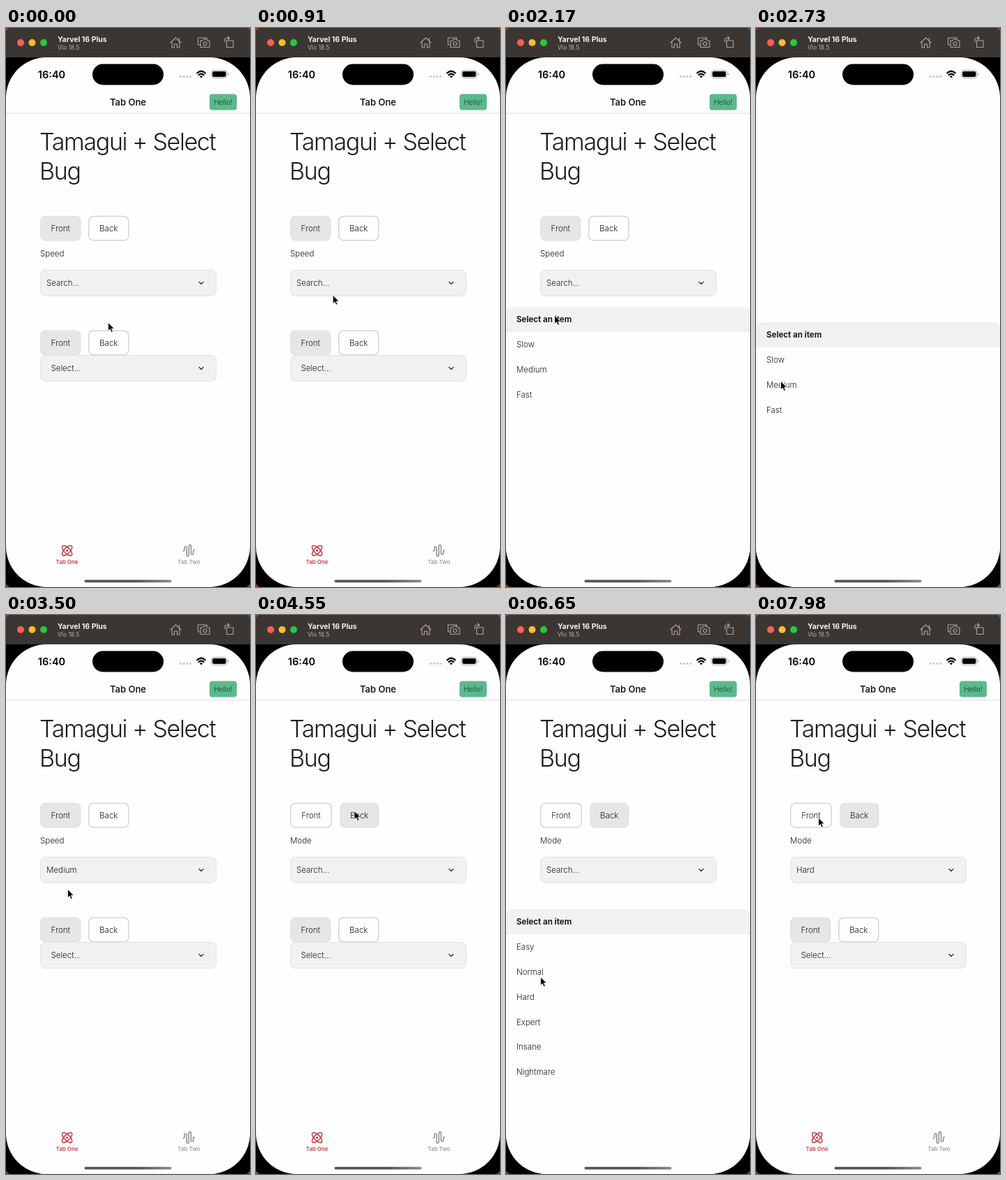
Recreate the animation shown at these times as an HTML page. Size 350 px wide and 800 px high, loop 8000 ms.

```html
<!DOCTYPE html>
<html lang="en">
<head>
<meta charset="utf-8">
<title>Select demo</title>
<style>
  html, body { margin: 0; width: 100%; height: 100%; overflow: hidden; background: #8d4c36; }
  svg { display: block; width: 100%; height: 100%; }
  text { font: 300 11.5px Inter, Roboto, sans-serif; fill: #1c1c1c; }
  .mid { text-anchor: middle; }
  .line { fill: none; stroke-linecap: round; stroke-linejoin: round; }
</style>
</head>
<body>
<svg viewBox="0 0 350 800" preserveAspectRatio="none">
  <defs>
    <clipPath id="screen"><rect y="42" width="350" height="758" rx="58"/></clipPath>
    <linearGradient id="bar"><stop offset=".6" stop-color="#565656"/><stop offset="1" stop-color="#8a8a8a"/></linearGradient>
  </defs>
  <rect width="350" height="800" rx="7"/>
  <path d="M0 42V7a7 7 0 0 1 7-7H343a7 7 0 0 1 7 7V42Z" fill="#3c3633"/>
  <circle cx="21" cy="21" r="5" fill="#ff5f57"/>
  <circle cx="37.5" cy="21" r="5" fill="#febc2e"/>
  <circle cx="54" cy="21" r="5" fill="#28c840"/>
  <text x="74" y="20" style="font-size:10.5px;font-weight:700;fill:#f3f1f0">Yarvel 16 Plus</text>
  <text x="74" y="31" style="font-size:8.5px;font-weight:400;fill:#b3aeab">Vlo 18.5</text>
  <g class="line" stroke="#aaa5a2" stroke-width="1.1">
    <path d="M236 21l7.5-7 7.500 7M238 20v8h3.500v-5h4v5h3.500v-8M248.500 18v-3.500"/>
    <path d="M278 24h-2.500v-10h12.500v2.500M279 18h3l1.500-2h4l1.500 2h3v9.500h-13z"/>
    <circle cx="285.500" cy="22.500" r="2.500"/>
    <path d="M316.500 18h9.500v9.500h-9.500zM314 20v-3.500q0-2 2-2h4M318 12l2.500 2.500-2.500 2.500"/>
  </g>

  <g clip-path="url(#screen)">
    <rect y="42" width="350" height="758" fill="#fefefe"/>
    <g id="page">
      <text class="mid" x="175" y="111" style="font-size:13px;font-weight:600">Tab One</text>
      <rect x="292" y="94.500" width="39" height="23" rx="4" fill="#5bb98c"/>
      <text class="mid" x="311.500" y="109.700" style="font-size:10px;fill:#193b2d">Hello!</text>
      <path d="M0 122H350" stroke="#dcdcdc"/>
      <g style="letter-spacing:-1.35px">
        <text x="48" y="175" style="font-size:34px">Tamagui + Select</text>
        <text x="48" y="217" style="font-size:34px">Bug</text>
      </g>
      <g id="frontRow"></g>
      <g id="backRow"></g>
      <text id="label" x="49" y="327"></text>
      <g id="search"></g>
      <g id="lowerRow"></g>
      <g id="lowerSelect"></g>
      <g class="line" stroke="#cf3f49" stroke-width="2" transform="translate(78 738.300) scale(.8)">
        <ellipse cx="12" cy="12" rx="11.700" ry="5" transform="rotate(45 12 12)"/>
        <ellipse cx="12" cy="12" rx="11.700" ry="5" transform="rotate(-45 12 12)"/>
        <circle cx="12" cy="12" r="1"/>
      </g>
      <path class="line" stroke="#929292" stroke-width="2" transform="translate(252.700 738.300) scale(.8)"
        d="M2 13a2 2 0 0 0 2-2V7a2 2 0 0 1 4 0v13a2 2 0 0 0 4 0V4a2 2 0 0 1 4 0v13a2 2 0 0 0 4 0v-4a2 2 0 0 1 2-2"/>
      <text class="mid" x="87.500" y="767" style="font-size:8px;font-weight:600;fill:#cf3f49">Tab One</text>
      <text class="mid" x="262.500" y="767" style="font-size:8px;font-weight:500;fill:#929292">Tab Two</text>
    </g>
    <g id="sheet">
      <rect width="350" height="900" rx="8" fill="#fefefe"/>
      <path d="M0 36V8a8 8 0 0 1 8-8H342a8 8 0 0 1 8 8V36Z" fill="#f1f1f1"/>
      <text x="15" y="22" style="font-weight:700">Select an item</text>
      <g id="speeds"></g>
      <g id="modes"></g>
    </g>
    <rect x="124" y="51.500" width="102" height="30" rx="15"/>
    <text class="mid" x="65.500" y="71.500" style="font-size:14.5px;font-weight:600;fill:#000">16:40</text>
    <path class="line" d="M250.500 69.500h16" stroke="#c6c6c6" stroke-width="3.200" stroke-dasharray="0 4.700"/>
    <g class="line" stroke="#000" stroke-width="2.200" style="stroke-linecap:butt">
      <path d="M273.500 65Q280 58.500 286.500 65M275.800 67.800Q280 63.500 284.200 67.800"/>
      <path d="M277.800 69.300Q280 67.200 282.200 69.300L280 71.500Z" fill="#000" stroke="none"/>
    </g>
    <rect x="294.500" y="60.500" width="22.500" height="11" rx="3.500" fill="none" stroke="#a9a9a9"/>
    <rect x="296" y="62" width="19.500" height="8" rx="2.300"/>
    <path d="M318.500 64v4q1.500-.7 1.500-2t-1.500-2" fill="#a9a9a9"/>
    <rect x="112.500" y="789.700" width="125" height="3.800" rx="1.900" fill="url(#bar)"/>
  </g>
  <path id="cursor" d="M0 0V12.200L2.800 9.600 4.700 14 6.900 13 5 8.800H8.900Z" stroke="#fff" stroke-width=".9"/>
</svg>
<script>
const LOOP = 8000, SHEET_OPEN = 421, SHEET_CLOSED = 800;
const $ = id => document.getElementById(id);

const button = (label, x, y, width, active) => `
  <rect x="${x + .75}" y="${y + .75}" width="${width - 1.5}" height="34.500" rx="6.500"
    fill="${active ? '#e6e6e6' : '#fefefe'}" stroke="${active ? '#e3e3e3' : '#d4d4d4'}" stroke-width="1.500"/>
  <text class="mid" x="${x + width / 2}" y="${y + 22.3}">${label}</text>`;

const buttonRow = (y, front) => front
  ? button('Front', 49, y, 58.5, true) + button('Back', 118, y, 58.5, false)
  : button('Front', 49, y, 60, false) + button('Back', 120, y, 56.5, true);

const select = (y, textX, value) => `
  <rect x="49.500" y="${y}" width="252" height="37" rx="7" fill="#f1f1f1" stroke="#e2e2e2"/>
  <text x="${textX}" y="${y + 22.6}">${value}</text>
  <path class="line" d="M276.800 ${y + 16.8}l3.200 3.200 3.200-3.200" stroke="#222" stroke-width="1.200"/>`;

const list = items => items.map((item, i) =>
  `<text x="15" y="${58.2 + i * 35.8}">${item}</text>`).join('');

$('frontRow').innerHTML = buttonRow(268.7, true);
$('backRow').innerHTML = buttonRow(268.7, false);
$('lowerRow').innerHTML = buttonRow(432.4, true);
$('search').innerHTML = select(346.5, 58, 'Search...');
$('lowerSelect').innerHTML = select(468.5, 64.5, 'Select...');
$('speeds').innerHTML = list(['Slow', 'Medium', 'Fast']);
$('modes').innerHTML = list(['Easy', 'Normal', 'Hard', 'Expert', 'Insane', 'Nightmare']);
const searchBox = $('search').querySelector('rect');
const searchText = $('search').querySelector('text');

// Pointer stops: time, x, y
const stops = [
  [0, 146.5, 421.5], [630, 112, 384], [840, 112, 384], [1260, 87.5, 362.5],
  [1900, 87.5, 362.5], [2590, 35.5, 505.5], [3080, 35.5, 505.5], [3920, 141, 280.5],
  [4760, 141, 280.5], [5250, 127.5, 361], [5800, 127.5, 361], [6600, 49.5, 518],
  [6680, 49.5, 518], [6860, 36, 543], [7040, 36, 543], [7630, 110.5, 306],
  [7730, 110.5, 306], [7980, 89.5, 290], [LOOP, 89.5, 290]
];

// Sheet moves: time, destination
const sheetMoves = [[1830, SHEET_OPEN], [2870, SHEET_CLOSED], [5420, SHEET_OPEN], [6940, SHEET_CLOSED]];

const show = (id, visible) => $(id).style.display = visible ? '' : 'none';

function pointerAt(t) {
  const i = stops.findIndex(stop => stop[0] > t);
  const [t0, x0, y0] = stops[i - 1], [t1, x1, y1] = stops[i];
  const p = (t - t0) / (t1 - t0), eased = p * p * (3 - 2 * p);
  return [x0 + (x1 - x0) * eased, y0 + (y1 - y0) * eased];
}

function sheetAt(t) {
  const move = sheetMoves.filter(([start]) => start <= t).pop();
  if (!move) return SHEET_CLOSED;
  const [start, to] = move, s = (t - start) / 1000;
  const from = SHEET_OPEN + SHEET_CLOSED - to;
  const spring = Math.exp(-8.9 * s) * (Math.cos(10 * s) + .89 * Math.sin(10 * s));
  return to + (from - to) * spring;
}

function valueAt(t) {
  if (t >= 2800 && t < 4060) return 'Medium';
  return t >= 6940 ? 'Hard' : 'Search...';
}

function render(now) {
  const t = now % LOOP, front = t < 4060;
  show('page', t < 2620 || t >= 3010);
  show('frontRow', front);
  show('backRow', !front);
  show('speeds', front);
  show('modes', !front);
  $('label').textContent = front ? 'Speed' : 'Mode';
  searchText.textContent = valueAt(t);
  const pressed = (t >= 1470 && t < 1830) || (t >= 5280 && t < 5420);
  searchBox.setAttribute('fill', pressed ? '#ececec' : '#f1f1f1');
  $('sheet').setAttribute('transform', `translate(0 ${sheetAt(t)})`);
  $('cursor').setAttribute('transform', `translate(${pointerAt(t)})`);
}

const begin = performance.now();
function frame() {
  render(performance.now() - begin);
  requestAnimationFrame(frame);
}
frame();
</script>
</body>
</html>
```
